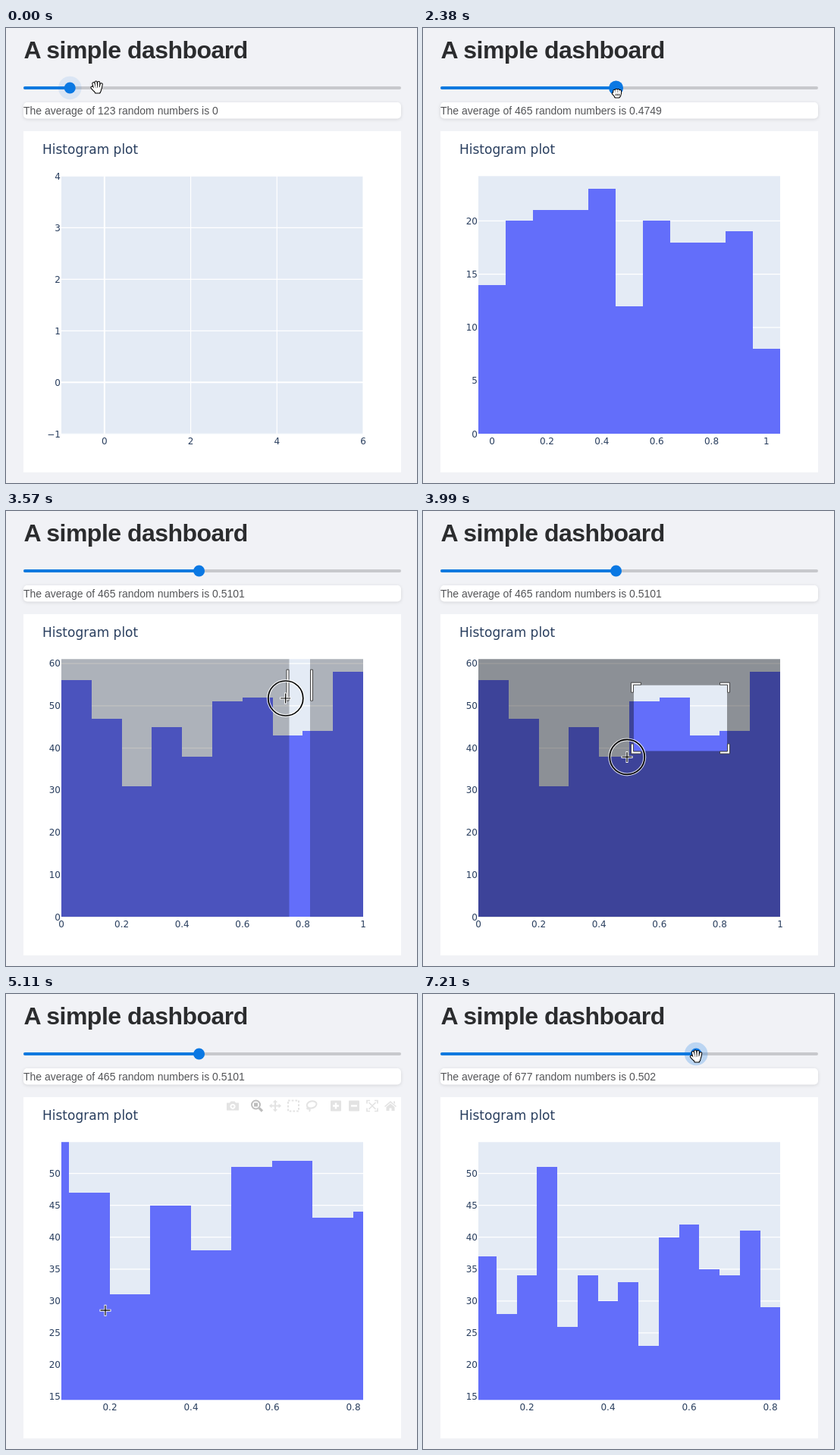
These frames come from a looping animation (542 px wide and 600 px high, 8000 ms). An HTML page:

```html
<!DOCTYPE html>
<html lang="en">
<head>
<meta charset="utf-8">
<title>A simple dashboard</title>
<style>
html, body { margin: 0; width: 100%; height: 100%; overflow: hidden; background: #f1f2f6; }
svg { display: block; width: 542px; height: 600px; }
.sans { font-family: "Liberation Sans", Arial, sans-serif; }
.plot { font: 12px "DejaVu Sans", Verdana, sans-serif; fill: #2a3f5f; }
.card { filter: drop-shadow(0 1px 2px rgba(0, 0, 0, .12)); }
.line { fill: none; stroke: #444; stroke-width: 2; }
</style>
</head>
<body>
<svg viewBox="0 0 542 600">
  <defs><clipPath id="area"><rect x="73" y="195.3" width="398" height="340"/></clipPath></defs>
  <rect width="542" height="600" fill="#f1f2f6"/>
  <text class="sans" x="23.5" y="40.3" font-size="32" font-weight="700" letter-spacing="-.52" fill="#2b2c2e">A simple dashboard</text>

  <rect x="23" y="77" width="498" height="4" rx="2" fill="#c7c8cc"/>
  <rect id="fill" x="23" y="77" height="4" rx="2" fill="#0f79df"/>
  <circle id="halo" cy="79" r="15.3" fill="#0f79e4"/>
  <circle id="thumb" cy="79" fill="#0a78e3"/>

  <rect class="card" x="23" y="98" width="498" height="21.5" rx="5" fill="#fff"/>
  <text id="note" class="sans" x="23" y="114" font-size="14" fill="#545558"></text>

  <rect x="23" y="136" width="498" height="450" fill="#fff"/>
  <g class="plot">
    <text x="48" y="165.5" font-size="17">Histogram plot</text>
    <g id="charts"></g>
  </g>
  <g id="zoom">
    <path id="dim" fill-rule="evenodd"/>
    <path id="corners" fill="#fff" stroke="#444"/>
  </g>
  <g id="bar"></g>
  <g id="tip" class="plot">
    <path d="M295 163h30l6-6 6 6h12v27h-54z" fill="#69738a"/>
    <text x="322" y="181" text-anchor="middle" style="fill:#fff">Zoom</text>
  </g>
  <g id="ring" fill="none">
    <circle stroke="#fff" stroke-width="4" opacity=".75"/>
    <circle stroke="#000" stroke-width="1.7"/>
  </g>
  <g id="cursor"></g>
</svg>
<script>
const $ = id => document.getElementById(id);
const LOOP = 8000, STEP = 70;
const L = 73, R = 471, T = 195.3, B = 535.3;
const clamp = v => Math.max(0, Math.min(1, v));
const range = (a, b, s) => Array.from({ length: Math.round((b - a) / s) + 1 }, (_, i) => +(a + i * s).toFixed(2));
const label = v => String(v).replace('-', '\u2212');

// ---- charts ----
function chart({ x, y, xt, yt, from, bin, counts, grid }) {
  const px = v => L + (v - x[0]) / (x[1] - x[0]) * (R - L);
  const py = v => B - (v - y[0]) / (y[1] - y[0]) * (B - T);
  const wide = v => grid && v === 0 ? 2 : 1.2;
  let s = `<rect x="${L}" y="${T}" width="${R - L}" height="${B - T}" fill="#e4ebf5"/><g clip-path="url(#area)" stroke="#fff">`;
  for (const v of yt) s += `<path d="M${L} ${py(v)}H${R}" stroke-width="${wide(v)}"/>`;
  if (grid) for (const v of xt) s += `<path d="M${px(v)} ${T}V${B}" stroke-width="${wide(v)}"/>`;
  if (counts) {
    const d = counts.map((c, i) => `V${py(c)}H${px(from + bin * (i + 1))}`).join('');
    s += `<path d="M${px(from)} ${py(0)}${d}V${py(0)}z" fill="#636efa" stroke="none" shape-rendering="crispEdges"/>`;
  }
  s += '</g>';
  for (const v of yt) s += `<text x="72" y="${py(v) + 4.2}" text-anchor="end">${label(v)}</text>`;
  for (const v of xt) s += `<text x="${px(v)}" y="548.8" text-anchor="middle">${label(v)}</text>`;
  return `<g>${s}</g>`;
}
const tenths = { from: 0, bin: .1, counts: [56, 47, 31, 45, 38, 51, 52, 43, 44, 58] };
const zoomed = { x: [.0804, .8243], y: [14.5, 54.9], xt: range(.2, .8, .2), yt: range(15, 50, 5) };
$('charts').innerHTML = [
  { x: [-1, 6], y: [-1, 4], xt: range(0, 6, 2), yt: range(-1, 4, 1), grid: true },
  { x: [-.05, 1.05], y: [0, 23 / .95], xt: range(0, 1, .2), yt: range(0, 20, 5), from: -.05, bin: .1,
    counts: [14, 20, 21, 21, 23, 12, 20, 18, 18, 19, 8] },
  { x: [0, 1], y: [0, 58 / .95], xt: range(0, 1, .2), yt: range(0, 60, 10), ...tenths },
  { ...zoomed, ...tenths },
  { ...zoomed, from: .075, bin: .05,
    counts: [37, 28, 34, 51, 26, 34, 30, 33, 23, 40, 42, 35, 34, 41, 29] }
].map(chart).join('');
const charts = [...$('charts').children];
const chartAt = [0, 490, 2520, 4970, 7140];
const averages = ['0', '0.4749', '0.5101', '0.5101', '0.502'];

// ---- toolbar ----
const square = '<rect x="-7" y="-7" width="14" height="14" rx="1" fill="#444"/>';
const icons = [
  [299, '<path fill="#444" fill-rule="evenodd" d="M-8-4h4l1.500-2h5l1.500 2h4v10h-16zM0-2.800a3.600 3.600 0 1 0 .01 0zM0-.8a1.600 1.600 0 1 1-.01 0z"/>'],
  [331, '<circle class="line" cx="-1.500" cy="-1.500" r="5.500"/><path fill="#444" d="M-4-4h5v5h-5z"/><path class="line" d="M2.800 2.800L7 7" style="stroke-width:3.200"/>'],
  [355, '<path class="line" d="M-6 0H6M0-6V6"/><path fill="#444" d="M-8 0l3.500-3v6zM8 0l-3.500-3v6zM0-8l-3 3.500h6zM0 8l-3-3.500h6z"/>'],
  [379, '<rect class="line" x="-7" y="-7" width="14" height="14" stroke-dasharray="2.700 2"/>'],
  [403, '<ellipse class="line" cx=".5" cy="-1.500" rx="6.500" ry="4.500" transform="rotate(-14)"/><path class="line" d="M-5 1.500q-2 3 1 2.500t1 3.500"/>'],
  [435, square + '<path d="M-4 0H4M0-4V4" stroke="#fff" stroke-width="2.400"/>'],
  [459, square + '<path d="M-4 0H4" stroke="#fff" stroke-width="2.400"/>'],
  [483, '<path class="line" style="stroke-width:1.700" d="M-7-3v-4h4M3-7h4v4M7 3v4h-4M-3 7h-4v-4M-4.500-4.500l9 9M4.500-4.500l-9 9"/>'],
  [507, '<path fill="#444" d="M0-6.500L8 .5 7 1.600 0-4.300-7 1.600-8 .5zM4-6h2v3.500l-2-1.600zM0-3L5.500 1.600V6.500h-4V3h-3v3.500h-4V1.600z"/>']
];
$('bar').innerHTML = icons.map(([x, d]) =>
  `<g transform="translate(${x} 147.5)" opacity="${x === 331 ? .7 : .3}">${d}</g>`).join('');

// ---- cursors ----
const hand = (d, palm, extra = '') => ['#000', '#fff'].map((c, i) =>
  `<path d="${d}" fill="none" stroke="${c}" stroke-width="${4.2 - 2 * i}" stroke-linecap="round"/>` +
  `<path d="${palm}" fill="${c}" stroke="${c}" stroke-width="${3 - 2 * i}" stroke-linejoin="round"/>`).join('') + extra;
const shapes = {
  open: hand('M-3.200 1L-4.800-4.800M-1 0L-1.600-6.300M1.800 0L2-6M4.500 1L5.500-3.700M-3.500 4L-6.700.6', 'M-4 1.500L5 .5 4.200 4.500 3 7H-2z'),
  closed: hand('M-3.200 0V-2.600M-.7-1V-3.600M1.900-1V-3.500M4.300 0V-2.500M-3.500 2L-4.500 1', 'M-4 0H5L4 4 3 5.500H-2z',
    '<path d="M-1 1.200v2.600M1 1.200v2.600M3 1.200v2.600" stroke="#000" stroke-width=".9"/>'),
  arrow: '<path d="M0 0V14.200L3.300 11 5.700 16.600 8 15.600 5.700 10.200H10z" fill="#000" stroke="#fff"/>',
  cross: '<path d="M-7.500 0H7.500M0-7.500V7.500" stroke="#fff" stroke-width="3"/><path d="M-6.500 0H6.500M0-6.500V6.500" stroke="#000" stroke-width="1.200"/>'
};
for (const k in shapes) $('cursor').innerHTML += `<g>${shapes[k]}</g>`;
const kinds = Object.keys(shapes);

// ---- pointer path: time, x, y ----
const path = [
  [0, 119.6, 78], [70, 119.6, 79], [210, 119.6, 83.5], [1050, 119.6, 83.5], [1190, 123, 83.5],
  [1400, 146.5, 84], [1820, 211, 84], [2030, 249, 84], [2100, 254.6, 84], [2310, 254.6, 84],
  [2450, 256, 86], [2800, 340, 165], [3080, 399.5, 231], [3290, 399.5, 231], [3570, 368, 247],
  [4130, 232, 354], [4620, 112, 449], [4830, 105, 454.5], [4970, 105, 454.5], [5320, 210, 305],
  [5600, 323, 168], [5740, 337, 142], [5810, 340, 127], [6160, 285, 92], [6510, 254.6, 82],
  [6720, 254.6, 82], [7000, 360.1, 82], [8000, 360.1, 82]
];
const slope = (i, k) => (path[i + 1][k] - path[i][k]) / (path[i + 1][0] - path[i][0]);
function tangent(i, k) {
  if (i === 0 || i === path.length - 1) return 0;
  const a = slope(i - 1, k), b = slope(i, k);
  return a * b <= 0 ? 0 : 2 * a * b / (a + b);
}
function pointer(t) {
  let i = 0;
  while (i < path.length - 2 && t >= path[i + 1][0]) i++;
  const p = path[i], q = path[i + 1], h = q[0] - p[0], u = (t - p[0]) / h;
  return [1, 2].map(k => {
    const w = u * u * (3 - 2 * u);
    return p[k] * (1 - w) + q[k] * w + h * u * (1 - u) * ((1 - u) * tangent(i, k) - u * tangent(i + 1, k));
  });
}

// press start, end, ring radius
const presses = [[70, 350, 30.5], [1050, 2310, 30.5], [3290, 4970, 23], [6720, 7070, 30.5]];
const ramp = (t, a, b, d) => clamp((t - a) / d) * clamp(1 - (t - b) / d);

function set(id, attrs) {
  for (const k in attrs) $(id).setAttribute(k, attrs[k]);
}

function kindAt(t, y) {
  const down = presses.some(([a, b, r]) => r > 25 && t >= a && t < b);
  if (down || (t >= 2310 && t < 2450)) return 'closed';
  if (t < 1050 || t >= 6720 || (t > 6300 && y < 92)) return 'open';
  return y > T ? 'cross' : 'arrow';
}

function drawZoom(t) {
  const on = t >= 3430 && t < 4970;
  $('zoom').style.display = on ? '' : 'none';
  if (!on) return;
  const r = 401, y0 = 229.7;
  const [l, yb] = pointer(t - 35);
  const strip = yb - y0 < .6 * (r - l);
  const t0 = strip ? T : y0, b = strip ? B : yb;
  const corner = (x, y, sx, sy) =>
    `M${x + 3.5 * sx} ${y - 9.5 * sy}h${-3 * sx}v${10 * sy}h${-10 * sx}v${3 * sy}h${13 * sx}z`;
  set('dim', {
    d: `M${L} ${T}H${R}V${B}H${L}zM${l} ${t0}V${b}H${r}V${t0}z`,
    'fill-opacity': .39 * clamp((t - 3446) / 200)
  });
  set('corners', {
    d: strip ? `M${l - .5} ${y0 - 20.5}h-3v41h3zM${r + .5} ${y0 - 20.5}h3v41h-3z`
      : corner(l, t0, -1, -1) + corner(r, t0, 1, -1) + corner(r, b, 1, 1) + corner(l, b, -1, 1)
  });
}

function draw(t) {
  const [x, y] = pointer(t);

  const held = t < 1050 ? 70 : t < 2310 ? t : t < 6720 ? 2310 : Math.min(t, 7070);
  const value = t < 70 ? 123 : Math.round((pointer(held)[0] - 23) / .498);
  const sx = 23 + value * .498;
  const grip = Math.max(...presses.filter(p => p[2] > 25).map(([a, b]) => ramp(t, a - 70, b, 140)));
  const glow = t < 1050 ? .1 : t >= 6440 ? .24 : 0;
  set('fill', { width: sx - 23 });
  set('thumb', { cx: sx, r: 7.5 + 4 * grip });
  set('halo', { cx: sx, opacity: t < 70 ? glow : glow * (1 - grip) });

  const n = chartAt.filter(s => t >= s).length - 1;
  charts.forEach((c, i) => c.style.display = i === n ? '' : 'none');
  $('note').textContent = `The average of ${value} random numbers is ${averages[n]}`;

  drawZoom(t);
  set('bar', { opacity: Math.max(ramp(t, 2660, 3290, 210), ramp(t, 4970, 5880, 280)) });
  $('tip').style.display = t >= 5670 && t < 5950 ? '' : 'none';

  const press = presses.find(([a, b]) => t >= a && t < b);
  $('ring').style.display = press ? '' : 'none';
  if (press) {
    const u = clamp((t - press[0]) / 210);
    set('ring', { transform: `translate(${x + .8} ${y - (press[2] > 25 ? .5 : 0)})`, opacity: .4 + .6 * u });
    for (const c of $('ring').children) c.setAttribute('r', press[2] * (1.2 - .2 * u));
  }

  const kind = kindAt(t, y);
  [...$('cursor').children].forEach((c, i) => c.style.display = kinds[i] === kind ? '' : 'none');
  set('cursor', { transform: `translate(${x + .6} ${y + (kind === 'closed' ? 1 : 0)})` });
}

const start = performance.now();
function tick() {
  const t = (performance.now() - start) % LOOP;
  draw(Math.floor(t / STEP) * STEP);
  requestAnimationFrame(tick);
}
tick();
</script>
</body>
</html>
```
